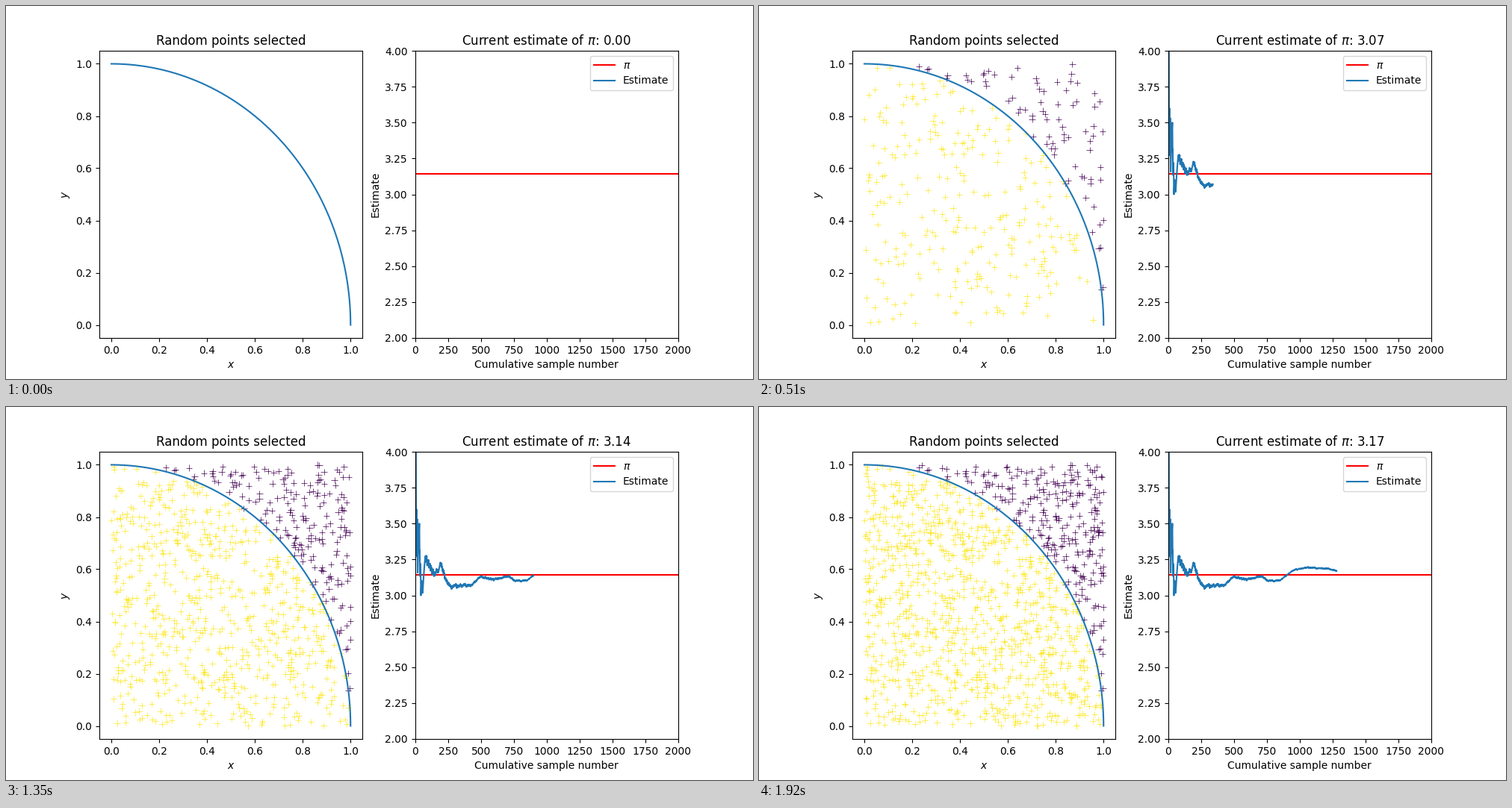
Recreate the animation shown at these times as a matplotlib script. Size 1000 by 500 pixels, loop 1.95 s.

```python
import numpy as np
import matplotlib.pyplot as plt
from matplotlib.animation import FuncAnimation

FRAMES = 65
STEP = 20                      # samples added per frame
BLOCK = 5                      # samples drawn together
TOTAL = (FRAMES - 1) * STEP

# Turning points of the running estimate: (sample number, value)
TREND = [
    (5, 4), (20, 3.3), (27, 3.55), (45, 3.05), (55, 3.04), (76, 3.27),
    (140, 3.15), (180, 3.18), (195, 3.23), (235, 3.1), (270, 3.06),
    (340, 3.07), (430, 3.07), (490, 3.13), (600, 3.11), (710, 3.135),
    (760, 3.1), (850, 3.105), (900, 3.14), (950, 3.175), (1060, 3.195),
    (1220, 3.185), (1280, 3.17),
]

rng = np.random.default_rng(12)


def draw_hits():
    """Random hits and misses whose running estimate follows TREND."""
    ends = np.arange(BLOCK, TOTAL + 1, BLOCK)
    goals = np.round(ends * np.interp(ends, *zip(*TREND)) / 4)
    hits, count = [], 0
    for goal in goals:
        k = int(np.clip(goal - count, 0, BLOCK))
        hits.extend(rng.permutation(np.arange(BLOCK) < k))
        count += k
    return np.array(hits, int)


def draw_point(hit):
    """Uniform point inside (hit) or outside the quarter circle."""
    while True:
        p = rng.random(2)
        if (p @ p < 1) == bool(hit):
            return p


hits = draw_hits()
points = np.array([draw_point(h) for h in hits])
number = np.arange(1, TOTAL + 1)
estimate = 4 * np.cumsum(hits) / number

fig, (left, right) = plt.subplots(1, 2, figsize=(10, 5), dpi=100)

angle = np.linspace(0, np.pi / 2, 200)
left.plot(np.cos(angle), np.sin(angle), color="C0")
dots = left.scatter(points[:, 0], points[:, 1], c=hits, marker="+",
                    linewidths=0.5, cmap="viridis", vmin=0, vmax=1)
left.set(xlim=(-0.05, 1.05), ylim=(-0.05, 1.05), xlabel="$x$", ylabel="$y$",
         title="Random points selected")

right.axhline(np.pi, color="red", label=r"$\pi$")
trace, = right.plot([], [], color="C0", label="Estimate")
right.set(xlim=(0, 2000), ylim=(2, 4), xticks=np.arange(0, 2001, 250),
          yticks=np.arange(2, 4.01, 0.25), xlabel="Cumulative sample number",
          ylabel="Estimate")
right.legend(loc="upper right")


def update(frame):
    n = frame * STEP
    dots.set_offsets(points[:n])
    dots.set_array(hits[:n])
    trace.set_data(number[:n], estimate[:n])
    value = estimate[n - 1] if n else 0
    right.set_title(rf"Current estimate of $\pi$: {value:.2f}")
    return dots, trace


anim = FuncAnimation(fig, update, frames=FRAMES, interval=30, repeat=True,
                     init_func=lambda: update(0))
plt.show()
```
